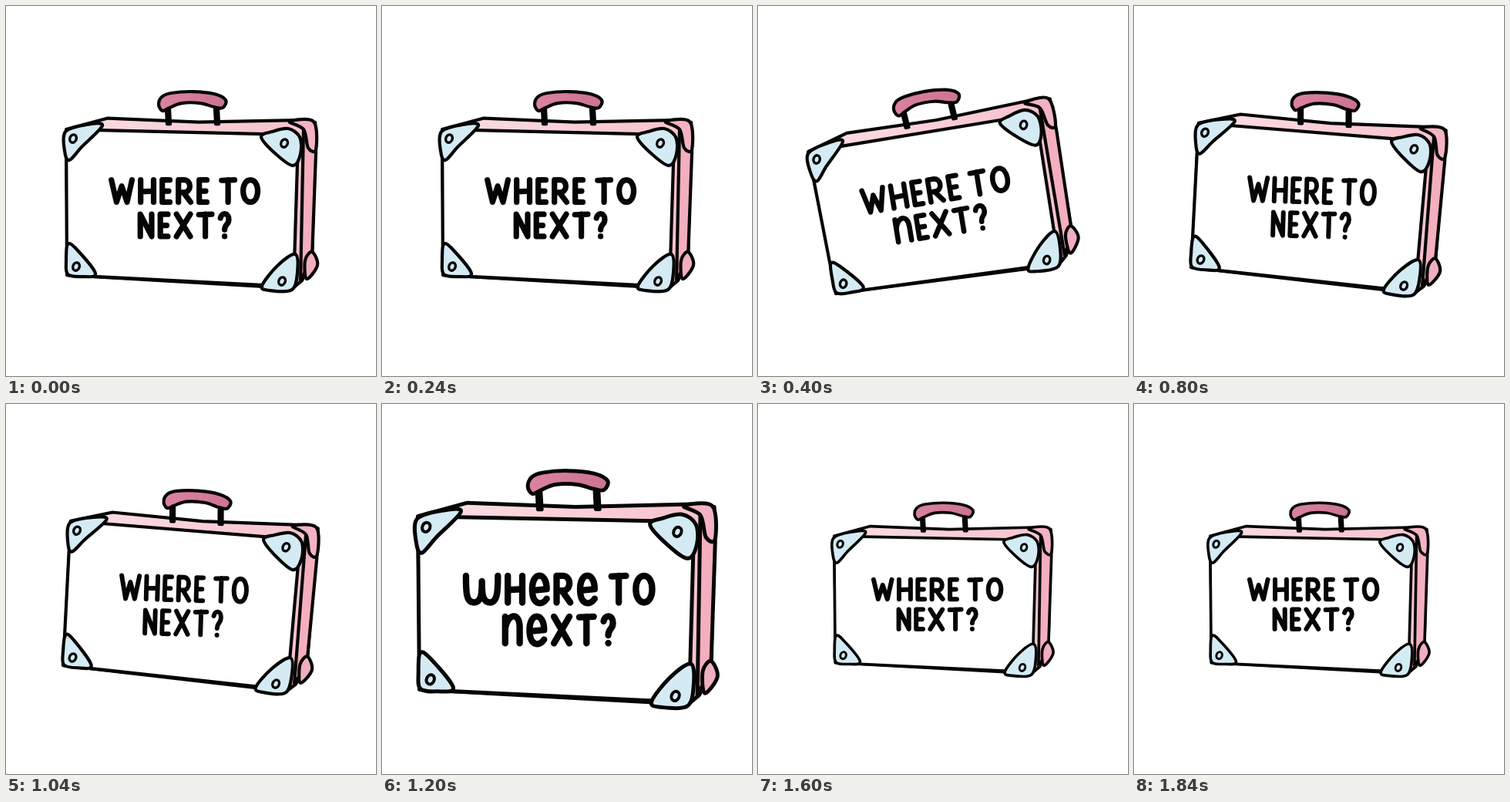
An HTML page with a canvas for the animation above (2 s loop, 480 by 480 pixels).

```html
<!DOCTYPE html>
<html lang="en">
<head>
<meta charset="utf-8">
<title>Where to next?</title>
<style>
html, body { margin: 0; width: 100%; height: 100%; overflow: hidden; background: #fff; }
canvas { display: block; width: 480px; height: 480px; }
</style>
</head>
<body>
<canvas id="stage" width="480" height="480" role="img" aria-label="Where to next?">Where to next?</canvas>
<script>
const ctx = document.getElementById('stage').getContext('2d');
const HOLD = 400;
const INK = '#050505', BLUE = '#d4ebf4';
const HUB = { x: 224.25, y: 261.25 };
const PEN = 4.2;

// Hand lettering: width of each letter and its strokes in a unit box.
const GLYPHS = {
  W: [34, 'M0 0L.25 1L.5 .28L.76 1L1 0'],
  w: [44, 'M0 0C0 .6 0 1 .25 1C.5 1 .5 .6 .5 .2C.5 .6 .5 1 .75 1C1 1 1 .5 1 0'],
  H: [24, 'M0 0V1M1 0V1M0 .53L1 .5'],
  E: [17, 'M1 0H0V1H1M0 .5H.85'],
  e: [24, 'M.05 .55L1 .5C1 -.18 0 -.18 0 .5C0 1.12 .7 1.12 1 .86'],
  R: [23, 'M0 1V0H.45C1.1 0 1.1 .56 .45 .56H0M.4 .56L1 1'],
  T: [24, 'M0 .02L1 0M.5 0V1'],
  O: [26, 'M.5 0C1.17 0 1.17 1 .5 1C-.17 1 -.17 0 .5 0Z'],
  N: [22, 'M0 1V0L1 1V0'],
  n: [24, 'M0 1V0M0 .45C.15 -.12 1 -.2 1 .4V1'],
  X: [25, 'M0 0L1 1M1 0L0 1'],
  '?': [18, 'M0 .17C.12 -.08 1 -.1 1 .24C1 .48 .5 .44 .5 .7M.5 .99V1']
};
const CAP = 36, LEAD = 44.5, GAP = 4, SPACE = 8;

// Case: x, y, turn, size. Words: tilt, letter width, pen.
const POSES = [
  { x: 224.3, y: 261.3, turn: 0, size: 1, tilt: 0, wide: 1, pen: 7.2, words: ['WHERE TO', 'NEXT?'] },
  { x: 226.5, y: 260.8, turn: -10.7, size: .993, tilt: -9.3, wide: 1, pen: 6.6, words: ['WHERE TO', 'nEXT?'] },
  { x: 223, y: 260.5, turn: 3.3, size: .993, tilt: 1.6, wide: .86, pen: 6, words: ['WHERE TO', 'NEXT?'] },
  { x: 221, y: 265.5, turn: -.2, size: 1.19, tilt: 0, wide: .95, pen: 7, words: ['wHeRe TO', 'neXT?'] },
  { x: 226.3, y: 259, turn: -.2, size: .87, tilt: 0, wide: 1, pen: 6.9, words: ['WHERE TO', 'NEXT?'] }
];

function ink(path, width = PEN) {
  ctx.lineWidth = width;
  ctx.strokeStyle = INK;
  ctx.stroke(path);
}

function shape(path, fill) {
  ctx.fillStyle = fill;
  ctx.fill(path);
  ink(path);
}

function polygon(fill, points) {
  shape(new Path2D('M' + points + 'Z'), fill);
}

// Smooth closed shape through points given as 'x,y x,y ...'.
function blob(fill, points) {
  const p = points.split(' ').map(s => s.split(',').map(Number));
  const at = i => p[(i + p.length) % p.length];
  const path = new Path2D();
  path.moveTo(...p[0]);
  p.forEach((b, i) => {
    const a = at(i - 1), c = at(i + 1), d = at(i + 2);
    path.bezierCurveTo(
      b[0] + (c[0] - a[0]) / 6, b[1] + (c[1] - a[1]) / 6,
      c[0] - (d[0] - b[0]) / 6, c[1] - (d[1] - b[1]) / 6, ...c);
  });
  shape(path, fill);
}

function fade(x0, x1, from, to) {
  const g = ctx.createLinearGradient(x0, 0, x1, 0);
  g.addColorStop(0, from);
  g.addColorStop(1, to);
  return g;
}

function rivet(x, y) {
  const ring = new Path2D();
  ring.ellipse(x, y, 4.2, 5.3, .4, 0, 7);
  ink(ring, 3.4);
}

function drawShell() {
  polygon(fade(110, 380, '#fbdbe1', '#f7c3ce'),
    '78,160 132,145.5 250,150.5 376,148 401,151 397,330 384,356 372,366 80,349');
  polygon('#f4afbe', '386,156 401,151 402,190 397,326 382,357');
  polygon('#fff', '78,161 122,161 335,166 379,170 373,364 79,349');
  blob('#f4b3c2', '368,150 399,150 402,186 392,184 386,160');
  blob('#f0afbe', '388,330 397,319 404,336 390,354');
}

function drawHandle() {
  for (const x of [208, 271]) polygon('#eda3b9', [x, 134, x + 4, 134, x + 5, 153, x + 1, 153]);
  blob(fade(200, 285, '#da82a2', '#cc7394'),
    '198,128 202,118 214,113 242,111 270,114 285,122 281,132 270,131 252,126 228,126 212,132 203,136');
}

function drawCorners() {
  blob(BLUE, '77,163 104,154 125,155 98,183 82,200 76,188');
  blob(BLUE, '331,170 345,163 366,159 381,170 382,192 372,207 350,192');
  blob(BLUE, '80,309 91,315 116,347 98,351 80,348 78,330');
  blob(BLUE, '375,322 352,337 332,363 342,369 371,368 378,345');
  rivet(87, 172);
  rivet(361, 178);
  rivet(91, 338);
  rivet(358, 357);
}

const step = ch => ch === ' ' ? SPACE : GLYPHS[ch][0] + GAP;

// One centred row of letters around height y.
function drawRow(row, y, wide, pen) {
  const total = [...row].reduce((sum, ch) => sum + step(ch), -GAP);
  let x = -total / 2;
  for (const ch of row) {
    if (ch !== ' ') {
      const [width, strokes] = GLYPHS[ch];
      const box = new DOMMatrix([width * wide - pen, 0, 0, CAP - pen,
        x * wide + pen / 2, y - (CAP - pen) / 2]);
      const path = new Path2D();
      path.addPath(new Path2D(strokes), box);
      ink(path, pen);
    }
    x += step(ch);
  }
}

function place(pose, turn, draw) {
  ctx.save();
  ctx.translate(pose.x, pose.y);
  ctx.rotate(turn * Math.PI / 180);
  ctx.scale(pose.size, pose.size);
  draw();
  ctx.restore();
}

function frame(now) {
  const pose = POSES[Math.floor(now / HOLD) % POSES.length];
  ctx.fillStyle = '#fff';
  ctx.fillRect(0, 0, 480, 480);
  ctx.lineCap = ctx.lineJoin = 'round';
  place(pose, pose.turn, () => {
    ctx.translate(-HUB.x, -HUB.y);
    drawShell();
    drawHandle();
    drawCorners();
  });
  place(pose, pose.tilt, () => {
    ctx.translate(7.3, 1);
    pose.words.forEach((row, i) => drawRow(row, (i - .5) * LEAD, pose.wide, pose.pen));
  });
  requestAnimationFrame(frame);
}

requestAnimationFrame(frame);
</script>
</body>
</html>
```
